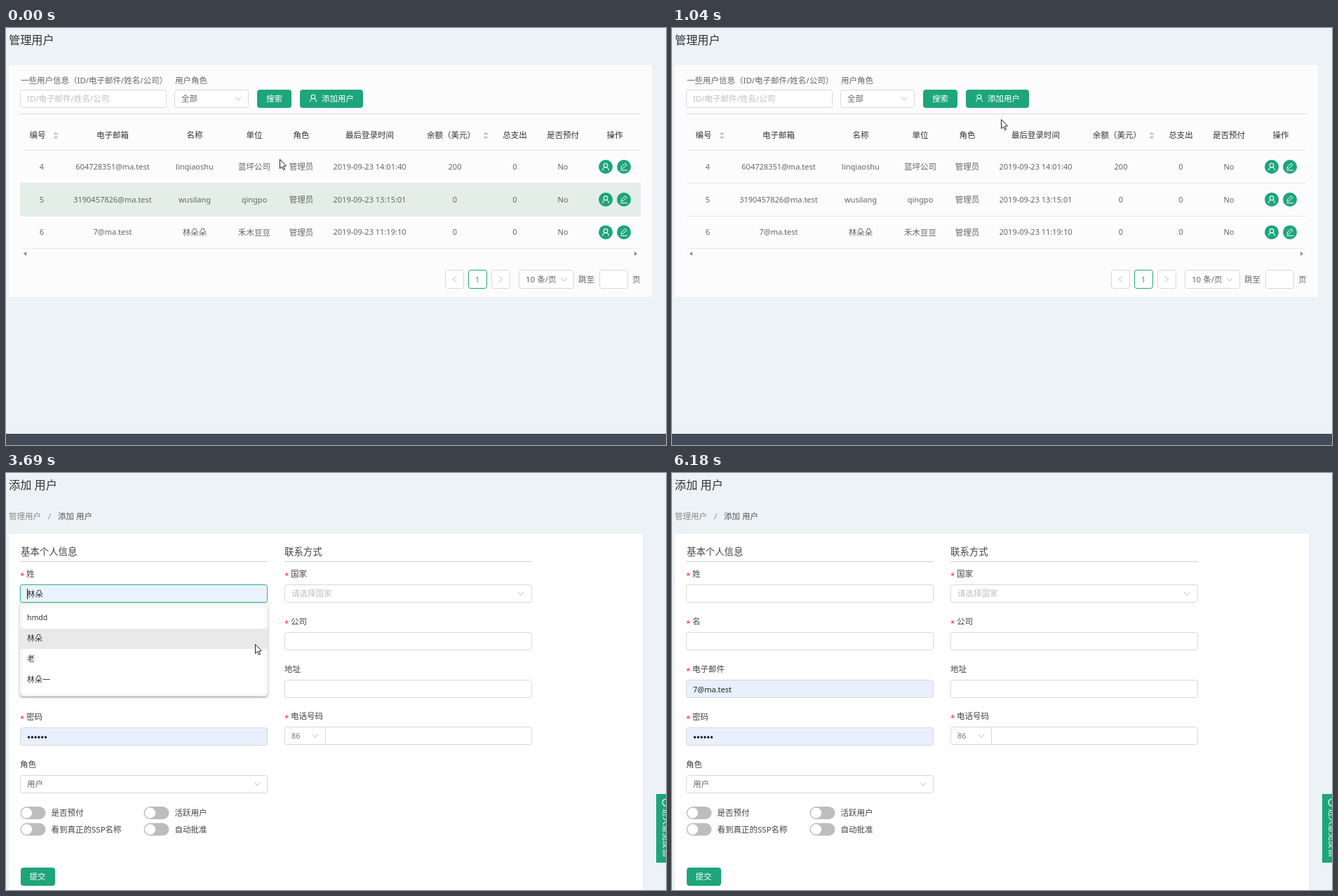
An HTML page with a canvas that plays this animation: 941 px wide and 595 px high, repeating every 7450 ms.

```html
<!DOCTYPE html>
<html lang="zh-CN">
<head>
<meta charset="utf-8">
<style>
html, body { margin: 0; width: 100%; height: 100%; overflow: hidden; background: #edf2f6; }
canvas { display: block; }
</style>
</head>
<body>
<canvas id="stage" width="941" height="595"></canvas>
<script>
const c = document.getElementById('stage').getContext('2d');
const LOOP = 7450, GREEN = '#1ea57a', HOVER = '#40b78f', EDGE = '#d7d7d7', FILLED = '#e8f0fd';
const FONT = '"Noto Sans", "Noto Sans CJK SC", "Noto Sans CJK", sans-serif';
const CARD = { family: '林朵', company: '禾木豆豆', mail: '7@ma.test' };

// time, shape, x, y of the pointer
const pointer = [
  [0, 'arrow', 390, 187], [120, 'arrow', 402, 153], [260, 'arrow', 430, 125], [380, 'arrow', 468, 169],
  [530, 'arrow', 484, 215], [650, 'arrow', 494, 281], [800, 'arrow', 490, 262], [920, 'arrow', 480, 190],
  [1040, 'arrow', 469, 130], [1190, 'arrow', 468, 126], [1340, 'arrow', 464, 118], [1460, 'hand', 460, 105],
  [1580, 'hand', 458, 96], [1730, 'hand', 458, 95], [2000, 'arrow', 465, 100], [2370, 'arrow', 400, 138],
  [2490, 'beam', 320, 170], [2640, 'beam', 255, 179], [2760, 'beam', 242, 184], [3030, 'beam', 242, 180],
  [3150, 'arrow', 266, 198], [3270, 'arrow', 292, 206], [3420, 'arrow', 325, 226], [3540, 'arrow', 346, 238],
  [3690, 'arrow', 355, 244], [3840, 'arrow', 430, 252], [3960, 'arrow', 515, 253], [4110, 'beam', 512, 247],
  [4260, 'beam', 510, 242], [4770, 'arrow', 508, 275], [4890, 'beam', 508, 312], [5010, 'beam', 507, 368],
  [5130, 'arrow', 498, 456], [5280, 'arrow', 488, 474], [5400, 'arrow', 465, 475], [5540, 'arrow', 350, 515],
  [5660, 'arrow', 236, 549], [5810, 'arrow', 180, 562], [5930, 'arrow', 138, 574], [6060, 'arrow', 100, 586],
  [6180, 'none', 0, 0]
];

// steps: [[start, value], ...]
const at = (steps, t) => steps.filter(s => s[0] <= t).pop();
const level = (steps, t) => at(steps, t)[1];

function text(s, x, y, { color = '#666', size = 11.5, align = 'left' } = {}) {
  c.font = size + 'px ' + FONT;
  c.fillStyle = color;
  c.textAlign = align;
  c.fillText(s, x, y + size * .37);
}
const mid = (s, x, y, color, size) => text(s, x, y, { color, size, align: 'center' });

function rect(x, y, w, h, color) {
  c.fillStyle = color;
  c.fillRect(x, y, w, h);
}

function box(x, y, w, h, fill, edge, r = 3) {
  c.beginPath();
  c.roundRect(x + .5, y + .5, w - 1, h - 1, r);
  c.fillStyle = fill;
  c.fill();
  c.lineWidth = 1;
  c.strokeStyle = edge || fill;
  c.stroke();
}

function line(points, color, width = 1) {
  c.beginPath();
  points.forEach(p => c.lineTo(...p));
  c.strokeStyle = color;
  c.lineWidth = width;
  c.stroke();
}

function shape(points, color) {
  c.beginPath();
  points.forEach(p => c.lineTo(...p));
  c.closePath();
  c.fillStyle = color;
  c.fill();
}

function disc(x, y, r, color) {
  c.beginPath();
  c.arc(x, y, r, 0, 7);
  c.fillStyle = color;
  c.fill();
}

const chevron = (x, y) => line([[x - 4, y - 2], [x, y + 2.5], [x + 4, y - 2]], '#bdbdbd');
const angle = (x, y, d) => line([[x - 3 * d, y - 4], [x + 3 * d, y], [x - 3 * d, y + 4]], '#c4c4c4');

function person(x, y) {
  c.strokeStyle = '#fff';
  c.lineWidth = 1.1;
  c.beginPath();
  c.arc(x, y - 2, 2.8, 0, 7);
  c.stroke();
  c.beginPath();
  c.arc(x, y + 5.2, 4.4, Math.PI, 0);
  c.stroke();
}

function pencil(x, y) {
  line([[x - 4, y + 2.5], [x - 3.3, y - .3], [x + 1.8, y - 5], [x + 4, y - 2.8], [x - 1.2, y + 2], [x - 4, y + 2.5]], '#fff');
  line([[x - 5, y + 5], [x + 5, y + 5]], '#fff');
}

function sorter(x, y) {
  shape([[x - 3.5, y - 1.5], [x, y - 5], [x + 3.5, y - 1.5]], '#bfbfbf');
  shape([[x - 3.5, y + 1.5], [x, y + 5], [x + 3.5, y + 1.5]], '#bfbfbf');
}

function listPage(t) {
  text('管理用户', 4, 17, { color: '#333', size: 16.2 });
  rect(4, 53, 917, 331, '#fcfcfc');
  rect(0, 579, 941, 16, '#444c59');

  text('一些用户信息（ID/电子邮件/姓名/公司）', 21, 75);
  text('用户角色', 241, 75);
  box(20, 88, 209, 26, '#fff', EDGE);
  text('ID/电子邮件/姓名/公司', 30, 101, { color: '#bfbfbf' });
  box(240, 88, 106, 26, '#fff', EDGE);
  text('全部', 250, 101);
  chevron(331, 100.5);
  box(358, 88, 49, 26, GREEN);
  mid('搜索', 382.5, 101, '#fff');
  box(419, 88, 90, 26, t >= 1460 ? HOVER : GREEN);
  person(438, 100);
  text('添加用户', 450, 101, { color: '#fff' });
  rect(20, 122, 885, 1, '#dadada');

  const heads = [['编号', 45], ['电子邮箱', 152], ['名称', 269], ['单位', 354], ['角色', 421], ['最后登录时间', 518.5],
    ['余额（美元）', 634.5], ['总支出', 725.5], ['是否预付', 794], ['操作', 868]];
  heads.forEach(([s, x]) => mid(s, x, 153, '#333'));
  sorter(71, 153.5);
  sorter(684, 153.5);

  const rows = [
    ['4', '604728351@ma.test', 'linqiaoshu', '蓝坪公司', '2019-09-23 14:01:40', '200'],
    ['5', '3190457826@ma.test', 'wusilang', 'qingpo', '2019-09-23 13:15:01', '0'],
    ['6', CARD.mail, '林朵朵', CARD.company, '2019-09-23 11:19:10', '0']
  ];
  const hover = [
    [[0, 0], [530, .6], [650, 1], [800, .4], [920, .3], [1040, 0]],
    [[0, .7], [120, 0]],
    [[0, 0], [800, .7], [920, .3], [1040, 0]]
  ];
  rect(20, 174, 885, 1, '#e9e9e9');
  rows.forEach(([id, mail, name, firm, last, money], i) => {
    const y = 198 + i * 46.7;
    const top = Math.round(175 + i * 46.7);
    c.globalAlpha = level(hover[i], t);
    rect(20, top, 885, 46, '#dbe8e0');
    c.globalAlpha = 1;
    rect(20, top + 46, 885, 1, '#e9e9e9');
    [[id, 51], [mail, 152], [name, 269], [firm, 354], ['管理员', 421], [last, 518.5], [money, 640], ['0', 725.5], ['No', 794]]
      .forEach(([s, x]) => mid(s, x, y, '#666', /^[ -~]+$/.test(s) ? 11 : 11.5));
    disc(855, y, 10, GREEN);
    person(855, y);
    disc(881, y, 10, GREEN);
    pencil(881, y);
  });
  shape([[25, 322], [29, 319], [29, 325]], '#8a8a8a');
  shape([[900, 322], [896, 319], [896, 325]], '#8a8a8a');

  box(626, 345, 27, 27, '#fff', EDGE);
  angle(639.5, 358.5, -1);
  box(659, 345, 27, 27, '#fff', GREEN);
  mid('1', 672, 358.5, GREEN);
  box(692, 345, 27, 27, '#fff', EDGE);
  angle(705, 358.5, 1);
  box(731, 345, 79, 27, '#fff', EDGE);
  text('10 条/页', 741, 358.5);
  chevron(795, 358.5);
  text('跳至', 816, 359);
  box(846, 345, 41, 27, '#fff', EDGE);
  text('页', 893, 359);
}

function field(label, x, y, { need = true, fill = '#fff', edge = EDGE, glow } = {}) {
  if (need) text('*', x, y + 2, { color: '#f5222d' });
  text(label, x + (need ? 9 : 0), y, { color: '#444' });
  if (glow) box(x - 1, y + 14, 355, 28, '#d9efe7', null, 4);
  box(x, y + 15, 353, 26, fill, glow ? HOVER : edge);
}

function toggle(label, x, y) {
  c.beginPath();
  c.roundRect(x, y - 9, 36, 18, 9);
  c.fillStyle = '#bdbdbd';
  c.fill();
  disc(x + 9, y, 7.6, '#fff');
  text(label, x + 44, y, { color: '#444' });
}

function popup(x, y, w, h) {
  c.save();
  c.shadowColor = 'rgba(0,0,0,.25)';
  c.shadowBlur = 4;
  c.shadowOffsetY = 1;
  box(x, y, w, h, '#fff');
  c.restore();
}

function formPage(t) {
  text('添加 用户', 4, 17, { color: '#333', size: 16.2 });
  text('管理用户', 4, 62, { color: '#8c8c8c' });
  text('/', 60, 62, { color: '#8c8c8c' });
  text('添加 用户', 74, 62, { color: '#555' });
  rect(4, 87, 904, 508, '#fefefe');
  text('基本个人信息', 21, 112, { color: '#444', size: 13.4 });
  text('联系方式', 397, 112, { color: '#444', size: 13.4 });
  rect(20, 126, 353, 1, '#c8cedb');
  rect(397, 126, 353, 1, '#c8cedb');

  const familyOpen = t >= 3030 && t < 4380;
  const companyFocus = t >= 4380 && t < 5280;
  const hint = level([[0, ''], [3150, 'hmdd'], [3420, CARD.family], [3840, '']], t);
  const companyHint = t >= 3150 && t < 3540;
  const saved = t >= 2370;
  const savedFill = saved ? FILLED : '#fff';

  field('姓', 20, 144, { glow: familyOpen, fill: hint ? '#e9f2fd' : '#fff', edge: t >= 2640 && t < 3030 ? HOVER : EDGE });
  field('名', 20, 212);
  field('电子邮件', 20, 280, { fill: savedFill });
  field('密码', 20, 348, { fill: savedFill });
  field('角色', 20, 416, { need: false });
  field('国家', 397, 144);
  field('公司', 397, 212, {
    glow: companyFocus, fill: companyHint ? FILLED : '#fff',
    edge: t >= 4110 && t < 4380 ? HOVER : EDGE
  });
  field('地址', 397, 280, { need: false });
  field('电话号码', 397, 347);
  rect(455, 363, 1, 24, EDGE);

  text(hint, 30, 172.5, { color: '#333' });
  if (familyOpen) rect(30, 165, 1, 15, '#222');
  if (companyHint) text(CARD.company, 407, 240, { color: '#333' });
  if (companyFocus) rect(407, 233, 1, 15, '#222');
  if (saved) {
    text(CARD.mail, 30, 309, { color: '#222', size: 11 });
    for (let i = 0; i < 6; i++) disc(32.5 + i * 4.8, 377, 1.7, '#111');
  }
  text('用户', 30, 443.5);
  chevron(358, 443.5);
  text('请选择国家', 407, 172, { color: '#bfbfbf' });
  chevron(734, 172);
  text('86', 407, 375, { color: '#777', size: 11 });
  chevron(441, 375);

  toggle('是否预付', 20.5, 485);
  toggle('活跃用户', 196.5, 485);
  toggle('看到真正的SSP名称', 20.5, 508.5);
  toggle('自动批准', 196.5, 508.5);
  box(21, 563, 49, 26, GREEN);
  mid('提交', 45, 576, '#fff');

  if (familyOpen) {
    popup(20, 187, 353, 131);
    const pick = level([[0, -1], [3150, 0], [3420, 1], [3840, -1]], t);
    ['hmdd', CARD.family, '老', CARD.family + '一'].forEach((s, i) => {
      const y = 206.5 + i * 29.4;
      if (i === pick) rect(20, Math.round(y - 14), 353, 29, '#e9e9ec');
      text(s, 30, y, { color: '#333', size: i ? 11 : 10.5 });
    });
  }
  if (t >= 4500 && t < 5280) {
    popup(397, 254, 353, 43);
    text(CARD.company, 407, 274.5, { color: '#333', size: 10.8 });
  }

  // side tab, cut off by the stage edge
  rect(927, 458, 14, 98, GREEN);
  c.beginPath();
  c.arc(941, 470, 5, 0, 7);
  c.strokeStyle = '#fff';
  c.lineWidth = 1.2;
  c.stroke();
  c.save();
  c.translate(941.5, 479);
  c.rotate(Math.PI / 2);
  text('进入意见反馈', 0, 0, { color: '#fff' });
  c.restore();
}

function drawPointer(kind, x, y) {
  if (kind === 'none') return;
  c.save();
  c.translate(x + .5, y + .5);
  if (kind === 'beam') {
    line([[-3, -6], [-1, -6], [0, -5], [1, -6], [3, -6]], '#222');
    line([[0, -5], [0, 5]], '#222', 1.2);
    line([[-3, 6], [-1, 6], [0, 5], [1, 6], [3, 6]], '#222');
  } else {
    const outline = kind === 'arrow'
      ? [[0, 0], [0, 13], [3, 10.3], [5, 15], [7, 14], [5, 9.6], [9, 9.3]]
      : [[0, 0], [2, 0], [2, 5], [8, 6.5], [8, 11], [6.5, 16], [-1, 16], [-5, 10], [-4, 8.5], [0, 11]];
    shape(outline, '#fff');
    line([...outline, outline[0]], '#222');
  }
  c.restore();
}

function frame(now) {
  const t = now % LOOP;
  rect(0, 0, 941, 595, '#edf2f6');
  (t < 2000 ? listPage : formPage)(t);
  const [, kind, x, y] = at(pointer, t);
  drawPointer(kind, x, y);
  requestAnimationFrame(frame);
}
requestAnimationFrame(frame);
</script>
</body>
</html>
```
